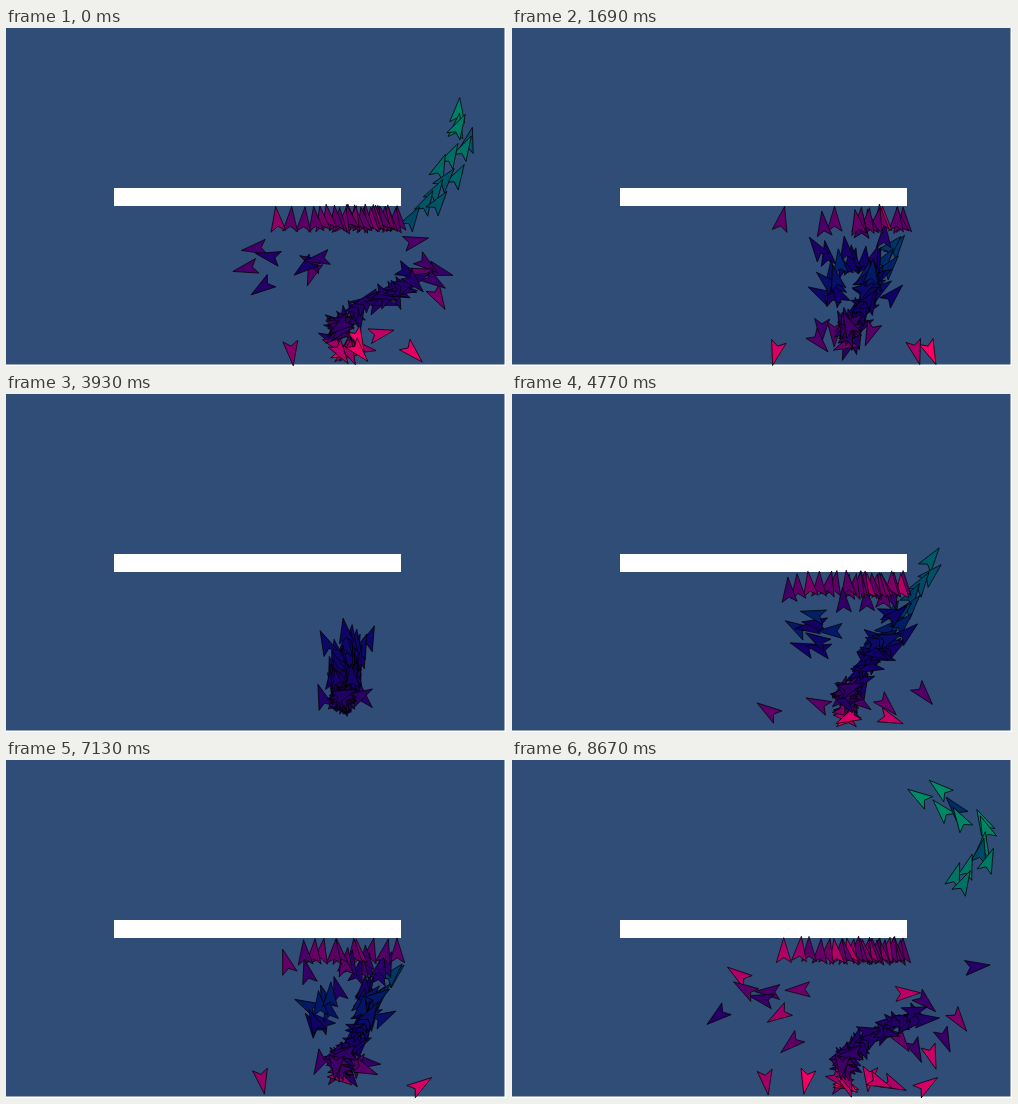
An HTML page with a canvas that plays this animation: 500x338 px, repeating every 8.71 s.

```html
<!DOCTYPE html>
<html lang="en">
<head>
<meta charset="utf-8">
<title>Evolving rockets</title>
<style>
html, body { margin: 0; width: 100%; height: 100%; overflow: hidden; background: #fff; }
canvas { display: block; }
</style>
</head>
<body>
<canvas id="stage" width="500" height="338"></canvas>
<script>
const ctx = document.getElementById('stage').getContext('2d');
const LOOP = 8710, LIFE = 2700, HEAD_START = 1900;
const STEP = LOOP / 186;
const HOME = [338, 306];
// Way round the right end of the wall, one point every 400 ms
const WAY = [HOME, [348, 278], [385, 225], [430, 172], [453, 125], [465, 75], [430, 35], [350, 10]];

let seed = 1;
function rand() {
  seed = (seed * 16807) % 2147483647;
  return seed / 2147483647;
}
const jitter = r => (rand() * 2 - 1) * r;
const mix = (a, b, u) => a + (b - a) * u;
const clamp = (v, lo, hi) => Math.max(lo, Math.min(hi, v));

// Each kind gives a route, a travel time and the fitness (0..9) it ends with;
// s runs from 0 to 1 through the group.
function leader(s, k) {
  const dx = jitter(14), dy = jitter(10);
  const route = WAY.map(([x, y], i) => {
    const w = Math.min(1, i / 3);
    return [x + dx * w, Math.max(7, y + dy * w)];
  });
  return { route, span: 2800, delay: s * 850, tilt: jitter(10), fit: k % 5 === 3 ? 5.5 : 9 };
}

function wallHitter(s) {
  const x = 391 - 75 * s - 45 * s ** 8 + jitter(2);
  return {
    route: [HOME, [mix(342, x, 0.4), 248], [x, 191 + jitter(2)]],
    span: mix(650, 1500, rand()), tilt: jitter(12), level: true, fit: 4 - 2.5 * rand() ** 6
  };
}

function straggler(s) {
  const dx = jitter(6), dy = jitter(6);
  return {
    route: [HOME, [338 + 26 * s + dx, 315 - 68 * s + dy], [330 + 82 * s + dx, 312 - 58 * Math.sqrt(s) + dy]],
    span: 1900, tilt: jitter(35), fit: 5.7
  };
}

function stray(s, k) {
  const x = k % 2 ? mix(205, 305, rand()) : mix(385, 485, rand());
  const y = mix(205, 300, rand());
  return {
    route: [HOME, [mix(342, x, 0.4), 238 + jitter(18)], [x, y]],
    span: 2300, tilt: jitter(25), fit: 5.6 - 5 * rand() ** 2
  };
}

function faller() {
  const x = 335 + 95 * (rand() * 2 - 1) ** 3;
  return {
    route: [HOME, [mix(338, x, 0.5), 302], [x, 325 - 30 * rand() ** 4]],
    span: mix(700, 1900, rand()), tilt: jitter(80), fit: 3 * rand()
  };
}

function idler() {
  return {
    route: [HOME, [335 + jitter(6), 300 + jitter(8)]],
    span: 800, tilt: jitter(110), fit: 5.2 + jitter(0.5)
  };
}

function crew(kind, n) {
  return Array.from({ length: n }, (_, k) => kind(k / (n - 1), k));
}

function generation(n) {
  seed = 4001 + n * 977;
  return [
    ...crew(leader, 13), ...crew(wallHitter, 26), ...crew(stray, 16),
    ...crew(straggler, 22), ...crew(faller, 13), ...crew(idler, 12)
  ];
}
const gens = [0, 1, 2, 3].map(generation);

// Catmull-Rom curve through the route
function along(route, u) {
  const last = route.length - 1;
  const i = Math.min(last - 1, Math.floor(u * last)), f = u * last - i;
  const at = j => route[clamp(j, 0, last)];
  return [0, 1].map(d => {
    const [a, b, c, e] = [at(i - 1)[d], at(i)[d], at(i + 1)[d], at(i + 2)[d]];
    return b + 0.5 * f * (c - a + f * (2 * a - 5 * b + 4 * c - e + f * (3 * (b - c) + e - a)));
  });
}

// Hue runs from pink through purple and navy to green
function shade(c) {
  const red = c < 7 ? 255 * (1 - c / 7) ** 1.2 : 0;
  const green = c > 6.3 ? 52 * (c - 6.3) : 0;
  return `rgb(${Math.round(red)},${Math.round(green)},102)`;
}

function drawRocket(x, y, angle, fill) {
  ctx.save();
  ctx.translate(x, y);
  ctx.rotate(angle);
  ctx.beginPath();
  ctx.moveTo(0, -13);
  ctx.lineTo(7.5, 12);
  ctx.lineTo(0, 7);
  ctx.lineTo(-7.5, 12);
  ctx.closePath();
  ctx.fillStyle = fill;
  ctx.fill();
  ctx.stroke();
  ctx.restore();
}

function fly(r, age) {
  const u = clamp((age - (r.delay || 0)) / r.span, 0, 1);
  const [x, y] = along(r.route, u);
  const v = Math.max(0.03, u);
  const [x1, y1] = along(r.route, v - 0.03), [x2, y2] = along(r.route, v);
  const course = Math.atan2(x2 - x1, y1 - y2) * (r.level ? 1 - u ** 4 : 1);
  // Height decides the fitness in flight, the outcome at the end
  const height = 5.6 + 3.4 * (1 - (y / 308) ** 2);
  const fit = r.fit === 9 ? height : mix(height, r.fit, u ** 3);
  drawRocket(x, y, course + r.tilt * Math.PI / 180, shade(fit));
}

function draw(t) {
  const time = Math.floor(t / STEP) * STEP + HEAD_START;
  ctx.fillStyle = '#fff';
  ctx.fillRect(0, 0, 500, 338);
  ctx.fillStyle = '#304d78';
  ctx.fillRect(0, 0, 498.5, 336.5);
  ctx.fillStyle = '#fff';
  ctx.fillRect(108, 160, 287, 18);
  ctx.strokeStyle = '#000';
  ctx.lineWidth = 0.7;
  drawRocket(338, 300, 0, '#fff');
  for (const r of gens[Math.floor(time / LIFE)]) fly(r, time % LIFE);
}

const begin = performance.now();
function tick() {
  draw((performance.now() - begin) % LOOP);
  requestAnimationFrame(tick);
}
tick();
</script>
</body>
</html>
```
